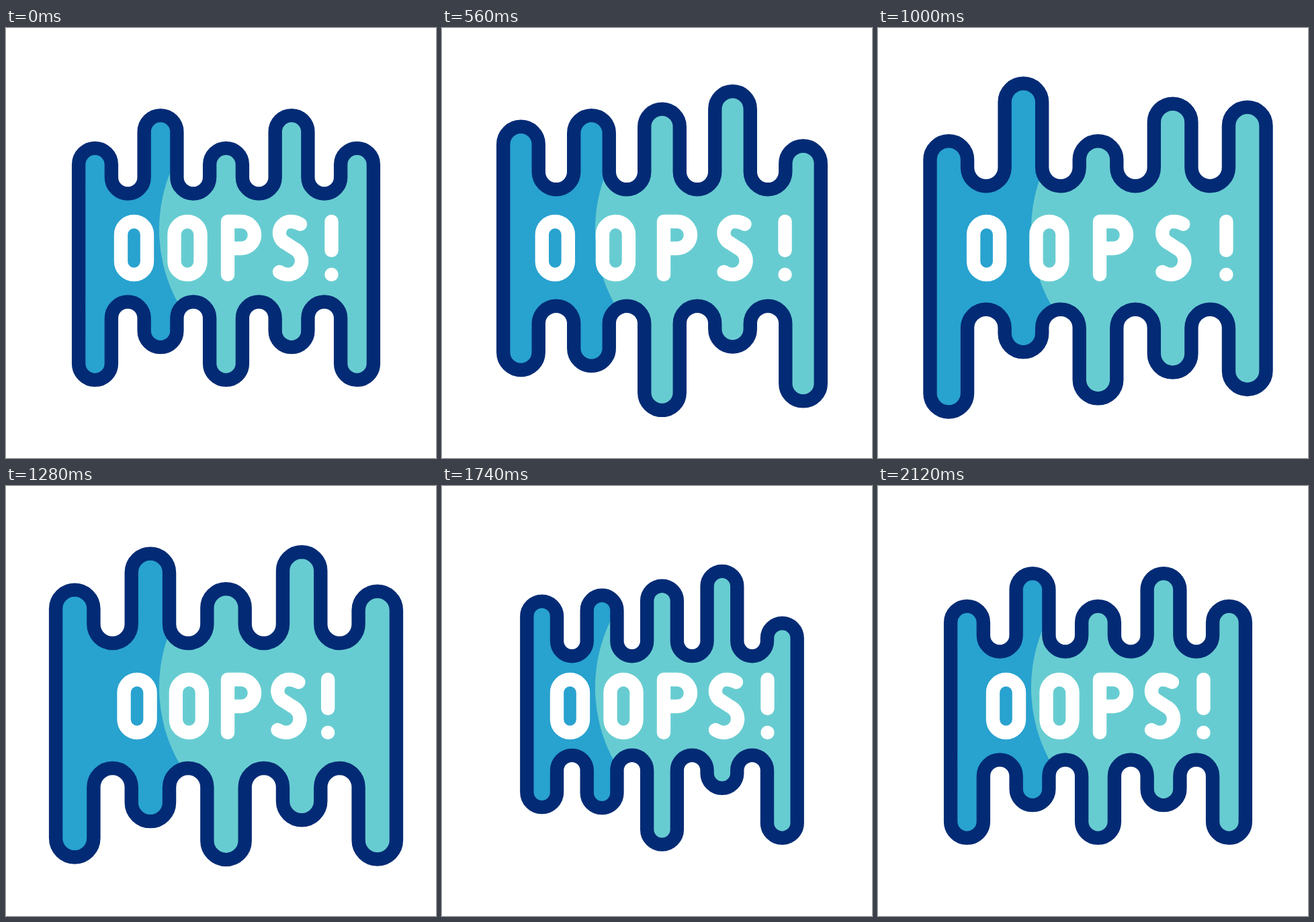
These frames come from a looping animation (640x640 px, 2400 ms). An HTML page:

```html
<!DOCTYPE html>
<html lang="en">
<head>
<meta charset="utf-8">
<title>Oops</title>
<style>
  html, body { margin: 0; width: 100%; height: 100%; overflow: hidden; background: #fff; }
  svg { display: block; width: 100vw; height: 100vh; }
  #letters { fill: none; stroke: #fff; stroke-width: 20.4; stroke-linecap: round; stroke-linejoin: round; }
</style>
</head>
<body>
<svg viewBox="0 0 640 640" role="img" aria-label="OOPS!">
  <clipPath id="inside"><path class="blob"/></clipPath>
  <path class="blob" fill="#28a2cf"/>
  <path clip-path="url(#inside)" fill="#67ccd1" d="M660 0H300V134A227 227 0 0 0 265.5 425V640H660Z"/>
  <path class="blob" fill="none" stroke="#032b75" stroke-width="20.4"/>
  <g id="letters">
    <rect x="171" y="288" width="39" height="79" rx="19.5"/>
    <rect x="250.5" y="288" width="39" height="79" rx="19.5"/>
    <path d="M330 367V288H350A20 20 0 0 1 350 328H330"/>
    <path d="M438 292Q431 288 424 288A17 17 0 0 0 416.5 320.3L428 327.8A20.5 20.5 0 0 1 419.7 367Q413 367 407 363"/>
    <path d="M484.5 288V331M484.5 367V367.01"/>
  </g>
</svg>
<script>
const LOOP = 2400, CX = 327.5, CY = 327;
const SPACING = 97.5, VALLEY = 80.5, STEP = 4;

// How far each finger stretches from rest, in steps, when the goo leans either way.
const LEAN_LEFT  = { up: [6, -5, 13, 6, -4],  down: [-9, 5, 8, -4, 5] };
const LEAN_RIGHT = { up: [-3, 6, -3, -3, 12], down: [6, -4, 0, 5, -4] };

const smooth = u => u * u * (3 - 2 * u);
const easeIn = u => u * u * (2 - u);
const linear = u => u;

const ramp = (t, from, to, ease = smooth) =>
  ease(Math.min(1, Math.max(0, (t - from) / (to - from))));
const pulse = (t, from, peak, to) => ramp(t, from, peak) - ramp(t, peak, to);

const scaleAt = t => 1
  + 0.077 * ramp(t, 100, 560, easeIn) + 0.091 * ramp(t, 560, 1200, linear)
  - 0.258 * ramp(t, 1200, 1800) + 0.09 * ramp(t, 1800, 2120);

// Letter gap: squeeze, spread wide, squeeze, relax.
const spreadAt = t =>
  -10.2 * pulse(t, 100, 280, 655) + 16.2 * (ramp(t, 280, 655) - ramp(t, 960, 1460))
  - 10.2 * pulse(t, 960, 1460, 1720);

// Fingers alternate short and long; the lower row mirrors the upper one.
function reaches(row, left, right) {
  const first = row === "up" ? -1 : 1;
  return LEAN_LEFT[row].map((step, i) => {
    const rest = 172.5 + first * (-1) ** i * SPACING / 4;
    return rest + STEP * (left * step + right * LEAN_RIGHT[row][i]);
  });
}

function blobPath(up, down, scale) {
  const r = SPACING * scale / 4;
  const edge = (lengths, side) => {
    const arc = sweep => `a${r} ${r} 0 0 ${sweep} ${-side * 2 * r} 0`;
    const valley = CY + side * (VALLEY * scale + r);
    return lengths
      .map(length => `V${CY + side * (length * scale - r)}${arc(1)}`)
      .join(`V${valley}${arc(0)}`);
  };
  return `M${CX - 9 * r} ${CY}${edge(up, -1)}${edge(down.reverse(), 1)}Z`;
}

const blobs = document.querySelectorAll(".blob");
const letters = [...document.getElementById("letters").children];

function draw(t) {
  const left = pulse(t, 150, 460, 900) + 0.915 * pulse(t, 1200, 1800, 2120);
  const right = pulse(t, 460, 900, 1200);
  const d = blobPath(reaches("up", left, right), reaches("down", left, right), scaleAt(t));
  blobs.forEach(blob => blob.setAttribute("d", d));

  const spread = spreadAt(t);
  letters.forEach((letter, i) => {
    const n = i - 2;
    letter.setAttribute("transform", `translate(${spread * (n + 0.04 * n * n)} 0)`);
  });
}

const start = performance.now();
function frame() {
  draw((performance.now() - start) % LOOP);
  requestAnimationFrame(frame);
}
draw(0);
requestAnimationFrame(frame);
</script>
</body>
</html>
```
